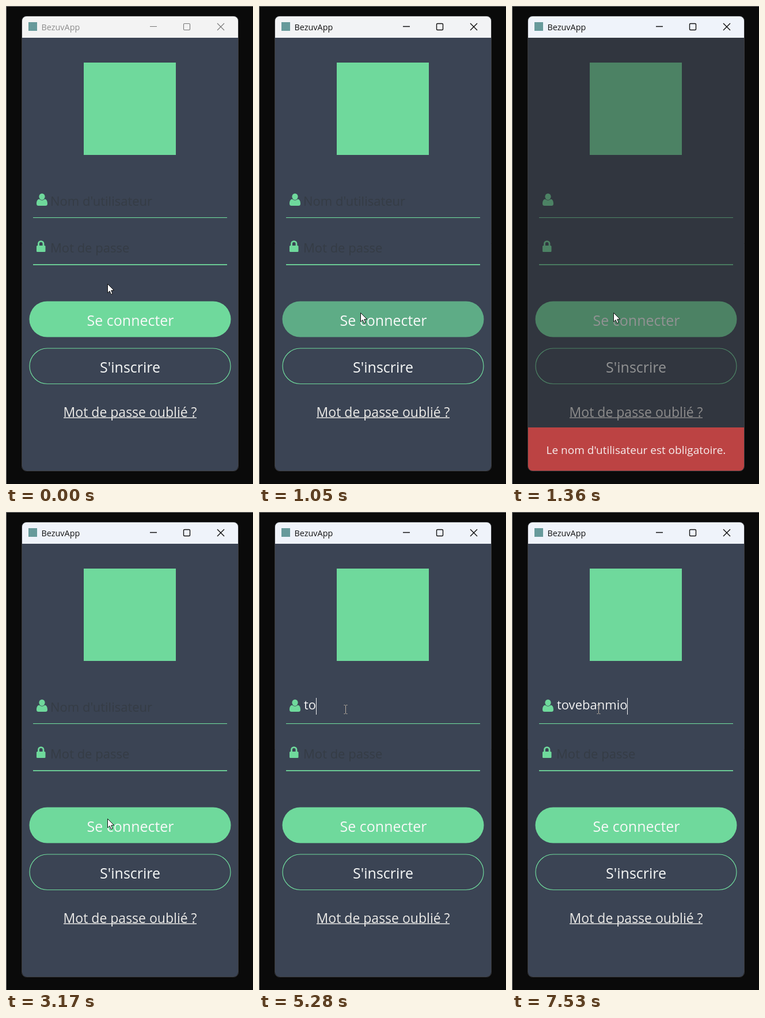
Recreate the animation shown at these times as an HTML page with a canvas. Size 429 px wide and 828 px high, loop 8 s.

```html
<!DOCTYPE html>
<html lang="fr">
<head>
<meta charset="utf-8">
<title>Connexion</title>
<style>
  html, body { margin: 0; width: 100%; height: 100%; overflow: hidden; background: #0a0a0a; }
  canvas { display: block; width: 429px; height: 828px; }
</style>
</head>
<body>
<canvas id="stage" width="429" height="828"></canvas>
<script>
const ctx = document.getElementById('stage').getContext('2d');
const LOOP = 8000;
const GREEN = '#6fd99c';
const BODY = '#3b4454';
const FONT = '"Open Sans", "Noto Sans", sans-serif';
const MIDDLE = 215.5;

const USER_NAME = 'tovebanmio';
const KEY_TIMES = [5120, 5280, 5590, 5900, 6170, 6420, 6700, 7010, 7280, 7530];
const PRESS = 1050;
const ALERT = { from: 1200, to: 3170 };

// Pointer stops: start time, shape, x, y
const POINTER = [
  [0, 'arrow', 176, 481],
  [500, 'arrow', 176, 504],
  [650, 'arrow', 176, 516],
  [775, 'arrow', 176, 526],
  [900, 'arrow', 176, 531],
  [3440, 'arrow', 176, 533],
  [3580, 'beam', 162.5, 427],
  [3730, 'beam', 156.5, 375],
  [3855, 'beam', 152.5, 350],
  [3980, 'beam', 150.5, 342]
];

const within = (t, from, to) => t >= from && t < to;

function rect(color, x, y, w, h) {
  ctx.fillStyle = color;
  ctx.fillRect(x, y, w, h);
}

function roundPath(x, y, w, h, r) {
  ctx.beginPath();
  ctx.roundRect(x, y, w, h, r);
}

function text(str, x, baseline, size, color, align = 'center') {
  ctx.font = `${size}px ${FONT}`;
  ctx.textAlign = align;
  ctx.fillStyle = color;
  ctx.fillText(str, x, baseline);
}

function line(...points) {
  ctx.beginPath();
  for (let i = 0; i < points.length; i += 2) ctx.lineTo(points[i], points[i + 1]);
  ctx.stroke();
}

function drawTitleBar(t) {
  const active = t >= PRESS;
  const barColor = t >= ALERT.from ? '#eff3fa' : active ? '#f2f3f5' : '#f3f3f3';
  rect(barColor, 28, 18, 376, 37);
  rect('#679a9b', 39, 28, 15, 15);
  text('BezuvApp', 61.5, 42, 14.4, active ? '#111' : '#8c8c8c', 'left');
  ctx.strokeStyle = active ? '#111' : '#777';
  ctx.lineWidth = active ? 1.4 : 1.1;
  line(250, 35.5, 262, 35.5);
  roundPath(308.5, 30.5, 11, 11, 1.5);
  ctx.stroke();
  line(367, 30, 379, 42);
  line(379, 30, 367, 42);
}

function drawUserIcon() {
  ctx.fillStyle = GREEN;
  ctx.beginPath();
  ctx.ellipse(62.5, 330.3, 5.1, 5.6, 0, 0, Math.PI * 2);
  ctx.fill();
  ctx.beginPath();
  ctx.moveTo(57.5, 334.5);
  ctx.quadraticCurveTo(62.5, 338.8, 67.5, 334.5);
  ctx.bezierCurveTo(71, 335, 72, 339, 72, 342.5);
  ctx.quadraticCurveTo(72, 346, 68.5, 346);
  ctx.lineTo(56.5, 346);
  ctx.quadraticCurveTo(53, 346, 53, 342.5);
  ctx.bezierCurveTo(53, 339, 54, 335, 57.5, 334.5);
  ctx.fill();
}

function drawLockIcon() {
  ctx.fillStyle = GREEN;
  roundPath(53, 415, 15.5, 11, 1.5);
  ctx.fill();
  ctx.strokeStyle = GREEN;
  ctx.lineWidth = 2.8;
  ctx.beginPath();
  ctx.moveTo(56.5, 416);
  ctx.lineTo(56.5, 412);
  ctx.arc(60.75, 411.8, 4.25, Math.PI, 0);
  ctx.lineTo(65, 416);
  ctx.stroke();
}

function drawFields(t, alert) {
  const hint = '#353c45';
  drawUserIcon();
  drawLockIcon();
  rect(GREEN, 47, 366, 337, 1.1);
  rect(GREEN, 47, 447.2, 337, 1.8);
  if (!alert) {
    if (t < 3290) text("Nom d'utilisateur", 77, 346, 22, hint, 'left');
    text('Mot de passe', 77, 427, 22, hint, 'left');
  }

  const typed = USER_NAME.slice(0, KEY_TIMES.filter(k => t >= k).length);
  text(typed, 78, 342, 22, '#f2f2f2', 'left');
  if (typed || within(t, 4260, 4820)) {
    const caretX = Math.floor(78 + ctx.measureText(typed).width);
    rect('#f2f2f2', caretX, typed ? 322 : 324, 1, typed ? 29 : 25);
  }
}

function drawButtons(pressed) {
  ctx.fillStyle = pressed ? '#5eac86' : GREEN;
  roundPath(40.5, 511.5, 350, 62, 31);
  ctx.fill();
  text('Se connecter', 216, 554, 25, '#f7f9f8');

  ctx.strokeStyle = GREEN;
  ctx.lineWidth = 1.2;
  roundPath(41, 593, 349, 61.5, 30.75);
  ctx.stroke();
  text("S'inscrire", MIDDLE, 635, 25, '#f7f9f8');

  text('Mot de passe oublié ?', MIDDLE, 712, 23, '#ecebe8');
  rect('#ecebe8', 100, 712.6, 231, 1.4);
}

function drawAlert() {
  rect('rgba(40, 40, 42, 0.49)', 28, 55, 376, 751);
  rect('#bc4343', 28, 730, 376, 76);
  text("Le nom d'utilisateur est obligatoire.", MIDDLE, 775.5, 19, '#f6eeee');
}

function drawArrow(x, y) {
  ctx.save();
  ctx.translate(x + 0.5, y + 0.5);
  ctx.beginPath();
  ctx.moveTo(0, 0);
  ctx.lineTo(0, 15.5);
  ctx.lineTo(3.6, 12.2);
  ctx.lineTo(6, 18);
  ctx.lineTo(8.6, 16.9);
  ctx.lineTo(6.2, 11.3);
  ctx.lineTo(11, 11);
  ctx.closePath();
  ctx.fillStyle = '#fff';
  ctx.fill();
  ctx.strokeStyle = '#111';
  ctx.lineWidth = 1;
  ctx.stroke();
  ctx.restore();
}

function drawBeam(x, y) {
  ctx.strokeStyle = '#b9afa0';
  ctx.lineWidth = 1;
  line(x, y - 7, x, y + 7);
  for (const end of [-7.5, 7.5]) {
    line(x - 3, y + end, x - 0.8, y + end);
    line(x + 0.8, y + end, x + 3, y + end);
  }
}

function drawPointer(t) {
  const [, shape, x, y] = POINTER.filter(stop => t >= stop[0]).pop();
  (shape === 'arrow' ? drawArrow : drawBeam)(x, y);
}

function draw(t) {
  const alert = within(t, ALERT.from, ALERT.to);

  rect('#0a0a0a', 0, 0, 429, 828);
  rect('#777', 0, 0, 429, 1);
  rect('#777', 0, 0, 1, 828);

  ctx.strokeStyle = '#3a3a3c';
  ctx.lineWidth = 1;
  roundPath(27.5, 17.5, 376, 788, 8);
  ctx.stroke();

  ctx.save();
  roundPath(28, 18, 375, 787, 7.5);
  ctx.clip();
  rect(BODY, 28, 18, 376, 788);
  drawTitleBar(t);
  rect(GREEN, 135, 98, 160, 160);
  drawFields(t, alert);
  drawButtons(within(t, PRESS, ALERT.from));
  if (alert) drawAlert();
  ctx.restore();

  drawPointer(t);
}

function tick() {
  draw(performance.now() % LOOP);
  requestAnimationFrame(tick);
}
tick();
</script>
</body>
</html>
```
